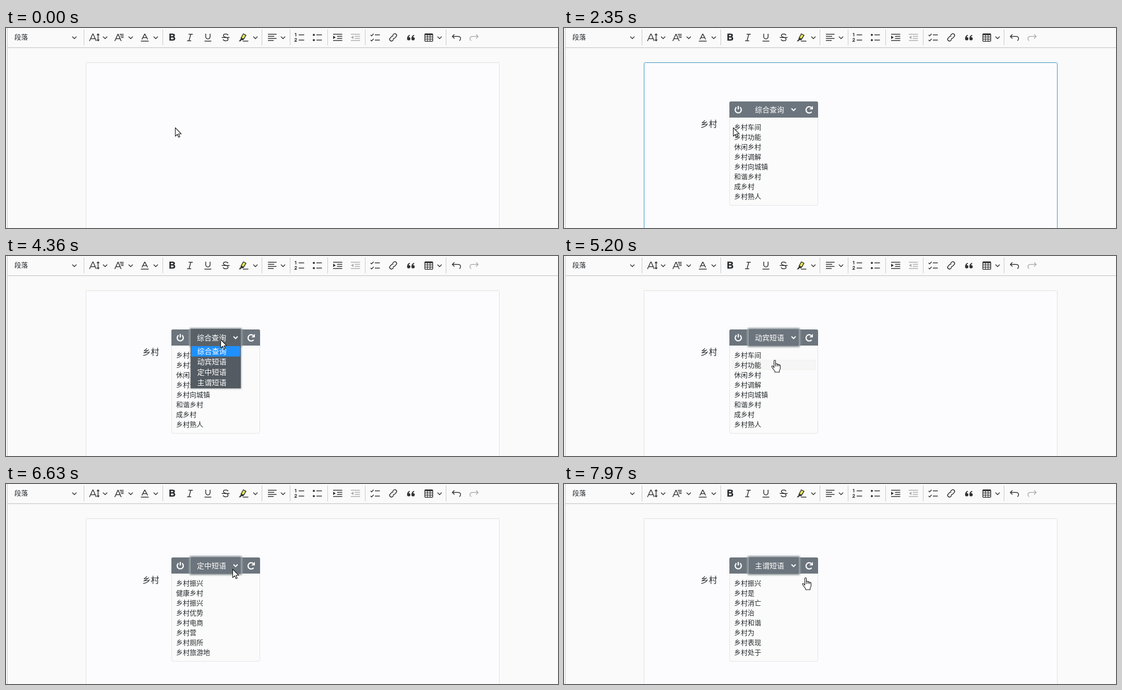
Animation of 1058x384 px, one loop 8000 ms. Source, as an HTML page:

```html
<!DOCTYPE html>
<html lang="zh-CN">
<head>
<meta charset="utf-8">
<title>短语查询</title>
<style>
  html, body { margin: 0; width: 100%; height: 100%; overflow: hidden; background: #fafafa; }
  svg { display: block; width: 100%; height: 100%; }
  text { font-family: "Noto Sans CJK SC", "Noto Sans CJK", "Noto Sans", sans-serif; fill: #262a2d; white-space: pre; }
  .latin { font-family: "Liberation Sans", sans-serif; }
  .icon { fill: none; stroke: #333; stroke-width: 1.5; }
  .solid { fill: #333; stroke: none; }
  .off { stroke: #adadad; }
  .off .solid { fill: #adadad; }
  .light { fill: none; stroke: #fff; stroke-width: 2.3; }
  .white { fill: #fff; }
  .pointer { fill: #fff; stroke: #111; stroke-width: 1.1; stroke-linejoin: round; }
</style>
</head>
<body>
<svg viewBox="0 0 1058 384">
  <defs>
    <path id="chevron" d="M-4-2L0 2 4-2"/>
    <path id="quote" d="M6.6 7.6A3.2 3.2 0 1 1 .2 7.6C.2 4 1.9 1.4 5 0L5.9 1.6C4.3 2.4 3.5 3.4 3.4 4.4A3.2 3.2 0 0 1 6.6 7.6Z"/>
    <filter id="blur" x="-20%" y="-30%" width="140%" height="160%"><feGaussianBlur stdDeviation="1.6"/></filter>
  </defs>

  <rect width="1058" height="384" fill="#fafafa"/>
  <path d="M2.5 0V384M2 37.5H1058" stroke="#c8c9c8"/>
  <path d="M3 38.5H1058" stroke="#ececeb"/>
  <rect id="paper" x="153.5" y="66.5" width="792" height="330" rx="2" fill="#fcfcff"/>

  <!-- Toolbar -->
  <text x="16" y="22" font-size="13">段落</text>
  <g id="seps" stroke="#c8c8c8"></g>
  <g id="chevrons" class="icon"></g>
  <g class="icon">
    <path d="M160 25L166.3 11.5H167L173 25M162.3 20.5H170.8M176.5 12V24M174.3 13.8L176.5 11.3 178.7 13.8M174.3 22.2L176.5 24.7 178.7 22.2"/>
    <path d="M208.5 25L214.5 12H215L220.8 25M210.7 20.5H218.8M218 12.2H225.5M219.2 15.2H225.5M220.5 18.2H225.5"/>
    <path d="M260.5 22L265.7 11.8H266.3L271.5 22M262.4 18.6H269.6M258.5 25.3H273.5"/>
    <path d="M350 12H358M347 24.5H355M354.2 12L350.8 24.5"/>
    <path d="M382.8 11V16.8A4.2 4.2 0 0 0 391.2 16.8V11M380.5 25.2H393.5"/>
    <path d="M425.6 14Q424.6 11.5 421 11.5 416.7 11.5 416.7 14.5 416.7 16.6 421 17.8 425.6 19 425.6 21.5 425.6 24.6 421.2 24.6 417 24.6 416.2 21.8M413.5 18.2H428.5"/>
    <path d="M450.6 19L454.9 11.2 459.9 13.8 455.6 21.4Z" fill="#e6e84a"/>
    <path d="M450 18.6L456 21.8 454 23.4 451 23.2 449.6 25.4H446.2L449.8 21Z" class="solid"/>
    <path d="M454 25.2H464.5"/>
    <path d="M502 12H518.5M502 16H514M502 20H518.5M502 24H513"/>
    <path d="M561 13.3H571.5M561 23.2H571.5M595 13.3H605.5M595 23.2H605.5"/>
    <path d="M553.5 11.2L555.6 10.2V16.2M553.3 21.5Q555.3 18.7 556.8 20.5 557.3 22 553.6 25.5H557.6" stroke-width="1.3"/>
    <circle cx="590" cy="13.3" r="2" class="solid"/><circle cx="590" cy="23.2" r="2" class="solid"/>
    <path d="M627 12H644.5M634.5 16H644.5M634.5 20H644.5M627 24H644.5"/>
    <path d="M627 14.7L632 18 627 21.3Z" class="solid"/>
    <g class="off">
      <path d="M661 12H678.5M668.5 16H678.5M668.5 20H678.5M661 24H678.5"/>
      <path d="M666 14.7L661 18 666 21.3Z" class="solid"/>
    </g>
    <path d="M698.8 13.2L700.8 15.2 704.6 11M698.8 23L700.8 25 704.6 20.8M707 13.3H716.5M707 23.2H716.5"/>
    <g transform="translate(742 18) rotate(-48)">
      <path d="M2-3.3H5A3.3 3.3 0 0 1 5 3.3H1.2A3.3 3.3 0 0 1-1.8 1.2M-2 3.3H-5A3.3 3.3 0 0 1-5-3.3H-1.2A3.3 3.3 0 0 1 1.8-1.2"/>
    </g>
    <use href="#quote" x="768.5" y="13" class="solid"/><use href="#quote" x="776.8" y="13" class="solid"/>
    <rect x="802.8" y="11.3" width="15" height="14.2" rx="1"/>
    <path d="M803 12.3H818" stroke-width="3"/>
    <path d="M803 17.2H818M803 21.3H818M807.8 12V25M812.8 12V25" stroke-width="1.2"/>
    <path id="undo" d="M859.5 12.3L855.5 16.2 859.5 20.2M855.8 16.2H866.5Q871.3 16.2 871.3 20.2 871.3 22.8 869 24.3"/>
    <use href="#undo" class="off" transform="translate(1760.5 0) scale(-1 1)"/>
  </g>
  <text x="312.2" y="24.4" font-size="17.5" class="latin" font-weight="bold" stroke="#262a2d" stroke-width=".5">B</text>

  <!-- Document text -->
  <text id="typed" x="261.5" y="190" font-size="16"></text>
  <path id="underline" stroke="#262a2d" stroke-dasharray="1 1"/>
  <path id="caret" stroke="#111"/>

  <!-- Phrase panel, drawn from its own top left corner -->
  <g id="panel">
    <path id="sheet" fill="#fafbfa" stroke="#e2e4e1"/>
    <rect id="hover" x="5" width="160" height="18" fill="#f5f6f5" stroke="#eaebe6" stroke-width=".6"/>
    <g id="list" font-size="13"></g>
    <path d="M0 31V3Q0 0 3 0H167Q170 0 170 3V31Z" fill="#6c757d"/>
    <g id="glow">
      <rect x="34" y="-3" width="102" height="37" rx="4" fill="#98a2a4" filter="url(#blur)"/>
      <rect x="37" y="-.5" width="96" height="32" rx="2" fill="#6c757d"/>
    </g>
    <g class="light">
      <path d="M13.6 11.2A5.9 5.9 0 1 0 20.4 11.2M17 8.8V15.6"/>
      <path d="M157.6 20A6 6 0 1 1 156.8 11.6"/>
      <path d="M160 8.6V15.2H153.4Z" fill="#fff" stroke="none"/>
    </g>
    <g id="menu">
      <rect x="36" y="0" width="98" height="114" fill="#6f7779" opacity=".65" filter="url(#blur)"/>
      <rect x="37" y="-1" width="96" height="33" fill="#5a6268"/>
      <rect x="37" y="32" width="96" height="81" fill="#545b62"/>
      <rect id="mark" x="38" width="94" height="20" fill="#1e90ff"/>
      <g id="options" font-size="14"></g>
    </g>
    <text id="choice" x="49" y="21.2" font-size="14" class="white"></text>
    <use href="#chevron" x="123" y="15.5" class="light" style="stroke-width:2"/>
  </g>

  <!-- Input method window -->
  <g id="ime">
    <rect id="imeBox" x="258.5" y="197.5" height="43" fill="#fcfcff" stroke="#c08a58"/>
    <rect id="imeFirst" x="258" y="197" height="44" fill="#ca6828"/>
    <g id="words"></g>
    <g id="smile" class="icon" stroke-width="1.3">
      <path d="M-22.5-22V21" stroke="#c08a58" stroke-width="1"/>
      <circle r="8.2"/>
      <path d="M-4.3 2.2Q0 7 4.3 2.2"/>
      <circle cx="-3" cy="-2.5" r="1.2" class="solid"/><circle cx="3" cy="-2.5" r="1.2" class="solid"/>
    </g>
  </g>

  <path id="arrow" class="pointer" d="M.5.5V16.8L4.3 13.2 6.8 18.8 9.2 17.8 6.8 12.3H12Z"/>
  <g id="hand" class="pointer">
    <path d="M-1.5 13V1.5Q-1.5 0 0 0T1.5 1.5V8Q1.5 6.6 3.2 6.8T4.7 8.5Q5 7.4 6.5 7.7T7.8 9.5Q8.2 8.6 9.4 9T10.5 10.7V15Q10.5 18 8.7 20V23H.2V21Q-2.5 18-5.5 13.2-6.5 11.5-5 11T-1.5 14.5Z"/>
    <path d="M1.5 7.5V12M4.7 8.5V12M7.8 9.5V12" fill="none"/>
  </g>
</svg>
<script>
const LOOP = 8000;
const $ = id => document.getElementById(id);
const set = (id, attrs) => { for (const k in attrs) $(id).setAttribute(k, attrs[k]); };
const show = (id, on) => $(id).style.display = on ? '' : 'none';
const fill = (id, html) => { const e = $(id); if (e.last !== html) { e.innerHTML = html; e.last = html; } };
const label = (x, y, s, attrs = '') => `<text x="${x}" y="${y}" ${attrs}>${s}</text>`;
// Latest entry whose start time has passed.
const current = (steps, t) => steps.filter(s => s[0] <= t).pop();
const within = (t, spans) => spans.some(([a, b]) => t >= a && t < b);

const kinds = ['综合查询', '动宾短语', '定中短语', '主谓短语'];
const typing = [
  [0, '', ''],
  [1100, 'x', '想 向 小 下 新 像 学'],
  [1220, 'xi', '西 吸 膝 舄 戏 习 曦'],
  [1330, 'xia', '下 夏 吓 瞎 霞 虾 峡'],
  [1410, 'xian', '先 线 现 县 险 闲 显'],
  [1500, 'xiang', '想 向 像 项 乡 香 相'],
  [1600, 'xiangc', '想吃 相处 乡村 相差 香菜 香肠'],
  [1690, 'xiangcu', '香醋 乡村 相促 想 向 像'],
  [1770, 'xiangcun', '乡村 相存 想存 想 向 像'],
  [1850, '乡村', '']
];
const lists = [
  [0, '组合三'],
  [2040, '乡村车间 乡村功能 休闲乡村 乡村调解 乡村向城镇 和谐乡村 成乡村 乡村熟人'],
  [5260, '走乡村 在乡村 投向乡村 流向乡村 留在乡村 像乡村 回归乡村 利用乡村'],
  [6330, '乡村振兴 健康乡村 乡村振兴 乡村优势 乡村电商 乡村营 乡村厕所 乡村旅游地'],
  [7620, '乡村振兴 乡村是 乡村消亡 乡村治 乡村和谐 乡村为 乡村表现 乡村处于']
];
const picks = [[0, 0], [5150, 1], [6210, 2], [7500, 3]];
const openSpans = [[3640, 5150], [5640, 6210], [6860, 7500]];
const caretSpans = [[310, 790], [1100, 2330], [2830, 3330]];
const route = [
  [0, 324, 191], [2560, 324, 191], [2860, 350, 220], [3340, 404, 163], [3600, 411, 160],
  [4480, 411, 160], [4950, 404, 200], [5250, 404, 200], [5600, 411, 160], [5700, 411, 160],
  [5930, 401, 220], [6280, 401, 220], [6600, 434, 163], [6900, 434, 163], [7380, 408, 239],
  [7560, 408, 239], [7900, 463, 180], [LOOP, 463, 180]
];

function mouseAt(t) {
  const i = Math.max(1, route.findIndex(p => p[0] > t));
  const [t0, x0, y0] = route[i - 1], [t1, x1, y1] = route[i];
  const k = (t - t0) / (t1 - t0), e = k * k * (3 - 2 * k);
  return [Math.round(x0 + (x1 - x0) * e), Math.round(y0 + (y1 - y0) * e)];
}

function drawText(t) {
  const [, word, found] = current(typing, t);
  const done = t >= 1850;
  $('typed').textContent = word;
  $('typed').setAttribute('class', done ? '' : 'latin');
  const end = word ? 261.5 + $('typed').getComputedTextLength() : 261.5;
  set('underline', { d: word && !done ? `M262 193.5H${end}` : '' });
  const cx = Math.round(end) + (done ? .5 : -.5);
  set('caret', { d: `M${cx} 175V194` });
  show('caret', within(t, caretSpans));

  show('ime', found);
  if (!found) return;
  let x = 258, html = '', first = 0;
  found.split(' ').forEach((w, i) => {
    const c = i ? '#111' : '#fff', d = i ? '#8a8a8a' : '#f6e4d8';
    html += label(x + 17, 226, i + 1, `class="latin" font-size="13" style="fill:${d}"`)
          + label(x + 27.5, 226.3, w, `font-size="18" style="fill:${c}"`);
    x += 60 + 18 * (w.length - 1);
    first = first || x - 257;
  });
  fill('words', html);
  set('imeFirst', { width: first });
  set('imeBox', { width: x + 45.5 - 258.5 });
  set('smile', { transform: `translate(${x + 24} 219)` });
}

function drawPanel(t, mx, my, hand) {
  show('panel', t >= 1180);
  const left = t < 1960 ? 296 : 317;
  const rows = current(lists, t)[1].split(' ');
  const bottom = 48 + 19 * Math.max(3, rows.length);
  const pick = current(picks, t)[1], open = within(t, openSpans);
  set('panel', { transform: `translate(${left} 141)` });
  set('sheet', { d: `M.5 30V${bottom - 4}Q.5 ${bottom - .5} 4 ${bottom - .5}H166Q169.5 ${bottom - .5} 169.5 ${bottom - 4}V30` });
  fill('list', rows.map((s, i) => label(9, 54 + 19 * i, s)).join(''));
  const row = Math.floor((my - 180.5) / 19 + .6);
  show('hover', hand && mx < left + 135 && row >= 0 && row < rows.length);
  set('hover', { y: 40 + 19 * row });

  $('choice').textContent = kinds[pick];
  show('glow', t >= 3560);
  show('menu', open);
  const over = my >= 173 ? Math.min(3, Math.floor((my - 173) / 20)) : pick;
  set('mark', { y: 32 + 20 * over });
}

function draw(t) {
  const [mx, my] = mouseAt(t);
  const hand = my > 172 && (t >= 1180 && t < 1900 || t >= 2560) && !within(t, openSpans);
  set('paper', { stroke: within(t, [[310, 3560]]) ? '#3a92bd' : '#dfe0da' });
  drawText(t);
  drawPanel(t, mx, my, hand);
  show('hand', hand);
  show('arrow', !hand);
  set(hand ? 'hand' : 'arrow', { transform: `translate(${mx} ${my})` });
}

fill('seps', [149, 300, 490, 544, 616, 688, 843].map(x => `<path d="M${x + .5} 3V33"/>`).join(''));
fill('chevrons', [131, 190, 239, 287, 478, 531, 831].map(x => `<use href="#chevron" x="${x}" y="18.5"/>`).join(''));
fill('options', kinds.map((s, i) => label(49.5, 47.2 + 20 * i, s, 'class="white"')).join(''));
// The mirrored arrow takes its grey from its own class.
let start;
function tick(now) {
  start ??= now;
  draw((now - start) % LOOP);
  requestAnimationFrame(tick);
}
draw(0);
requestAnimationFrame(tick);
</script>
</body>
</html>
```
